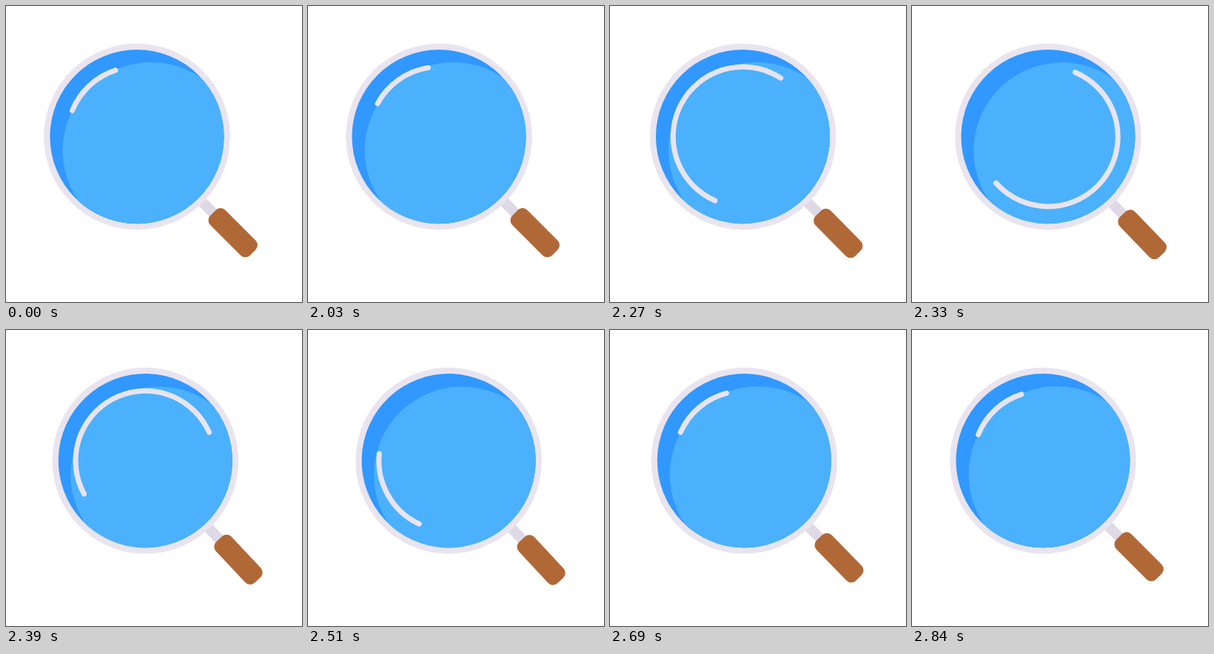
Write an HTML page with a canvas that moves like this. It is 400 px wide and 400 px high and loops after 2900 ms.

```html
<!DOCTYPE html>
<html lang="en">
<head>
<meta charset="utf-8">
<title>Magnifying glass</title>
<style>
  html, body { margin: 0; width: 100%; height: 100%; overflow: hidden; background: #fff; }
  canvas { display: block; width: 400px; height: 400px; }
</style>
</head>
<body>
<canvas id="stage"></canvas>
<script>
const LOOP = 2900, START = 2030, STEP = 30, LAST = 2840;
const RIM = '#e9e4ee', NECK = '#dfd9e5', GRIP = '#b16837';
const GLASS = '#4bb1fd', SHADE = '#3098ff';
const RAD = Math.PI / 180;

const canvas = document.getElementById('stage');
const ctx = canvas.getContext('2d');
const dpr = window.devicePixelRatio || 1;
canvas.width = canvas.height = 400 * dpr;

// The glint makes three clockwise turns; its head runs ahead of its tail.
const times = [2000, 2030, 2270, 2390, 2510, 2600, 2840];
const head = spline(times, [252, 261.2, 662.5, 1054.2, 1263.7, 1335.8, 1332]);
const tail = spline(times, [202, 208.3, 473.2, 869.7, 1193, 1284, 1282]);

// Smooth curve through the points that never overshoots them.
function spline(x, y) {
  const n = x.length - 1;
  const slope = i => (y[i + 1] - y[i]) / (x[i + 1] - x[i]);
  const tangent = x.map((_, i) => {
    if (i === 0 || i === n) return 0;
    const a = slope(i - 1), b = slope(i);
    return a * b > 0 ? 2 * a * b / (a + b) : 0;
  });
  return t => {
    if (t <= x[0]) return y[0];
    if (t >= x[n]) return y[n];
    let i = 0;
    while (t > x[i + 1]) i++;
    const h = x[i + 1] - x[i], u = (t - x[i]) / h, v = 1 - u;
    return v * v * (1 + 2 * u) * y[i] + u * u * (3 - 2 * u) * y[i + 1]
      + h * u * v * (v * tangent[i] - u * tangent[i + 1]);
  };
}

function ease(t, from, to) {
  const u = Math.min(1, Math.max(0, (t - from) / (to - from)));
  return u * u * (3 - 2 * u);
}

function disc(x, y, r, color) {
  ctx.beginPath();
  ctx.arc(x, y, r, 0, 2 * Math.PI);
  ctx.fillStyle = color;
  ctx.fill();
}

function drawHandle() {
  ctx.save();
  ctx.rotate(45 * RAD);
  ctx.fillStyle = NECK;
  ctx.fillRect(118, -7, 34, 14);
  ctx.beginPath();
  ctx.roundRect(145.4, -14.3, 76, 28.6, 9);
  ctx.fillStyle = GRIP;
  ctx.fill();
  ctx.restore();
}

function drawLens() {
  disc(0, 0, 125.8, RIM);
  disc(0, 0, 117.6, SHADE);
  ctx.save();
  ctx.beginPath();
  ctx.arc(0, 0, 117.6, 0, 2 * Math.PI);
  ctx.clip();
  disc(18.9, 18.6, 119.3, GLASS);
  ctx.restore();
}

function drawGlint(t) {
  ctx.beginPath();
  ctx.arc(0, 0, 94.3, tail(t) * RAD, head(t) * RAD);
  ctx.lineWidth = 7;
  ctx.lineCap = 'round';
  ctx.strokeStyle = RIM;
  ctx.stroke();
}

function draw(now) {
  const ms = now % LOOP;
  const t = ms < START ? 0
    : Math.min(LAST, START + Math.floor((ms - START) / STEP) * STEP);
  const sway = 13.8 * (ease(t, 2198, 2460) - ease(t, 2460, 2830));

  ctx.setTransform(dpr, 0, 0, dpr, 0, 0);
  ctx.fillStyle = '#fff';
  ctx.fillRect(0, 0, 400, 400);
  ctx.translate(177 + sway, 176.6);
  ctx.rotate(sway * 0.155 * RAD);
  drawHandle();
  drawLens();
  drawGlint(t);
}

const begin = performance.now();
function tick() {
  draw(performance.now() - begin);
  requestAnimationFrame(tick);
}
tick();
</script>
</body>
</html>
```
